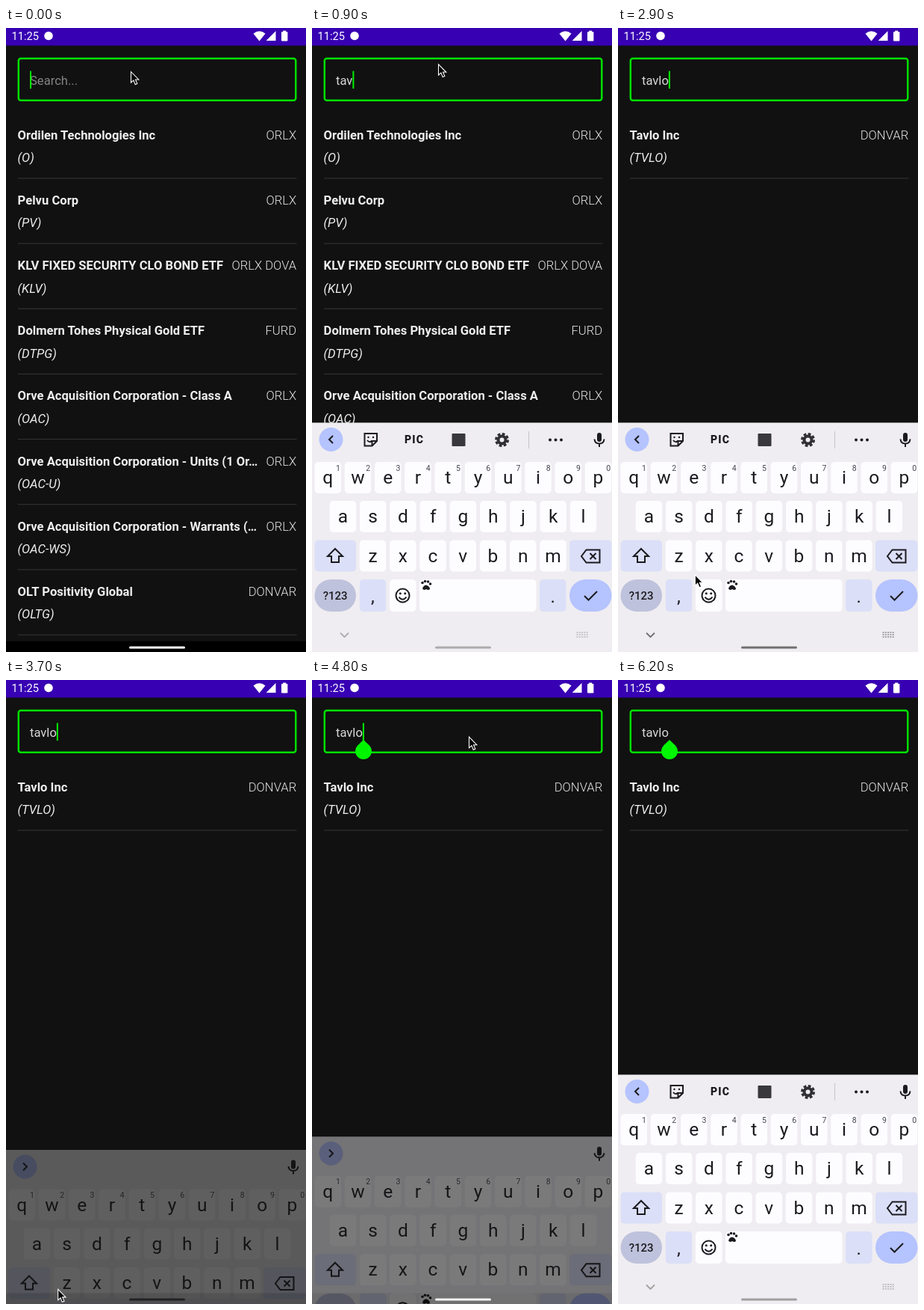
These frames come from a looping animation (402x834 px, 6.4 s). An HTML page:

```html
<!DOCTYPE html>
<html lang="en">
<head>
<meta charset="utf-8">
<title>Stock search</title>
<style>
html, body { margin: 0; width: 100%; height: 100%; overflow: hidden; background: #111; }
svg { display: block; width: 402px; height: 834px; font-family: Roboto, sans-serif; }
.app text { font-size: 16.6px; fill: #eee; }
.app .name { font-weight: 700; }
.app .ticker { font-style: italic; }
.app .market { font-weight: 300; text-anchor: end; fill: #e4e4e4; }
.keys text { text-anchor: middle; fill: #1b1b1f; font-size: 24.5px; }
.keys .digit { font-size: 10.5px; fill: #45464f; }
.line { fill: none; stroke: #1b1b1f; stroke-width: 2; }
</style>
</head>
<body>
<svg id="stage" viewBox="0 0 402 834"></svg>
<script>
const LOOP = 6400;
const WORD = 'tavlo';
const TYPED_AT = [700, 800, 900, 1200, 1450];
const FILTER_AT = 1700;
const TAP_AT = 4650;

// time, x, y of the pointer tip
const POINTER = [[0, 167, 58], [900, 169, 48], [2400, 169, 48], [2900, 103, 730], [3200, 43, 806],
  [3500, 43, 808], [3700, 69, 815], [4300, 186, 121], [4500, 210, 72], [4700, 210, 72], [5000, 210, 83]];
// time, visible share of the keyboard
const KEYBOARD = [[150, 0], [450, 1], [3500, 1], [3800, 0], [4680, 0], [4950, 1]];
// time, grey level of the navigation marks
const NAV = [[150, 255], [450, 232], [900, 172], [1600, 112], [3500, 112], [3680, 34], [3720, 34],
  [4300, 176], [4600, 255], [4950, 234], [5500, 190], [6200, 160]];

const STOCKS = [
  ['Ordilen Technologies Inc', 'O', 'ORLX'],
  ['Pelvu Corp', 'PV', 'ORLX'],
  ['KLV FIXED SECURITY CLO BOND ETF', 'KLV', 'ORLX DOVA'],
  ['Dolmern Tohes Physical Gold ETF', 'DTPG', 'FURD'],
  ['Orve Acquisition Corporation - Class A', 'OAC', 'ORLX'],
  ['Orve Acquisition Corporation - Units (1 Or…', 'OAC-U', 'ORLX'],
  ['Orve Acquisition Corporation - Warrants (…', 'OAC-WS', 'ORLX'],
  ['OLT Positivity Global', 'OLTG', 'DONVAR'],
];

const rect = (x, y, w, h, fill, r = 0, more = '') =>
  `<rect x="${x}" y="${y}" width="${w}" height="${h}" rx="${r}" fill="${fill}" ${more}/>`;
const circle = (x, y, r, fill, more = '') => `<circle cx="${x}" cy="${y}" r="${r}" fill="${fill}" ${more}/>`;
const text = (x, y, s, more = '') => `<text x="${x}" y="${y}" ${more}>${s}</text>`;
const path = (d, more = 'class="line"') => `<path d="${d}" ${more}/>`;

function row([name, ticker, market], i) {
  const y = i * 87.17;
  return text(15.6, y + 148.8, name, 'class="name"') +
    text(389.2, y + 148.8, market, 'class="market"') +
    text(15.6, y + 179.3, `(${ticker})`, 'class="ticker"') +
    rect(16, y + 200.4, 373.5, 1, '#363636');
}

function statusBar() {
  return rect(0, 0, 402, 23.5, '#3700b3') +
    text(7.5, 16.4, '11:25', 'font-size="14.6" fill="#fff"') +
    circle(57, 10.5, 5.8, '#fff') +
    path('M331.5 7.5Q339.5 1 347.5 7.5L339.5 17.5ZM349 17V16.5L361.5 4V17Z', 'fill="#fff"') +
    rect(369, 5, 8.4, 12.5, '#fff', 1.2) + rect(371.2, 3.6, 4, 2, '#fff');
}

function keyRow(letters, x, y, digits = '') {
  return [...letters].map((c, i) => {
    const left = x + i * 40.25;
    return rect(left, y, 35.5, 42, '#fdfcff', 5) + text(left + 17.7, y + 29, c) +
      (digits ? text(left + 31.5, y + 11.5, digits[i], 'class="digit"') : '');
  }).join('');
}

function toolbar() {
  return path('M70.5 542H87V552L80.5 558.5H70.5ZM87 552H80.5V558.5M74 551Q77 555 80.5 551.5') +
    circle(75.5, 547, 1.2, '#1b1b1f') + circle(82, 547, 1.2, '#1b1b1f') +
    text(137, 555, 'PIC', 'style="font-size:14px;font-weight:900;letter-spacing:1.2px"') +
    rect(187.5, 542, 18, 17, '#38383d', 1) +
    circle(254.5, 550.5, 5, 'none', 'stroke="#303034" stroke-width="4"') +
    circle(254.5, 550.5, 8, 'none', 'stroke="#303034" stroke-width="3" stroke-dasharray="3.8 2.483"') +
    rect(290, 539, 1, 23, '#c6c5cb') +
    [319, 326.5, 334].map(x => circle(x, 550.5, 2, '#1b1b1f')).join('');
}

function keyboard() {
  const special = '#dbdff8', accent = '#b5c3ff', dark = '#1b1b1f';
  const paw = [[148, 741.5], [151.5, 739.5], [155.5, 740], [158.5, 743]];
  let dots = '';
  for (let i = 0; i < 15; i++)
    dots += rect(354.5 + i % 5 * 3.3, 807 + (i / 5 | 0) * 3, 2, 1.7, 'currentColor', 0, 'opacity=".7"');
  return rect(0, 527.5, 402, 307, '#efedf1') +
    circle(25.5, 550, 16, accent) + '<path id="fold" class="line"/>' +
    `<g id="tools">${toolbar()}</g>` +
    rect(382, 541, 6, 12, dark, 3) + path('M378.5 549.5Q379 555.5 385 555.5T391.5 549.5M385 555.5V560') +
    keyRow('qwertyuiop', 3.5, 580, '1234567890') +
    keyRow('asdfghjkl', 23.7, 632) +
    keyRow('zxcvbnm', 63.8, 684.5) +
    rect(3.5, 684.5, 55.5, 42, special, 5) + path('M31 696L41 706H36V714H26V706H21Z') +
    rect(345, 684.5, 56.5, 42, special, 5) +
    path('M361 706L367.5 697.5H385.5V714.5H367.5ZM372.500 702L380.500 710M380.500 702L372.500 710') +
    rect(3.5, 737, 55.5, 43, '#bfc2dc', 21.5) +
    text(31.2, 764, '?123', 'style="font-size:15px;font-weight:500"') +
    rect(63.8, 737, 35.5, 43, special, 5) + text(81.5, 768, ',') +
    rect(104, 737, 35.5, 43, '#fdfcff', 5) +
    circle(121.5, 758.5, 9, 'none', 'class="line"') + path('M116.5 760.5Q121.5 767 126.5 760.5') +
    circle(118.3, 755.8, 1.5, dark) + circle(124.7, 755.8, 1.5, dark) +
    rect(144, 737, 156.5, 43, '#fdfcff', 5) +
    paw.map(([x, y]) => circle(x, y, 1.8, dark)).join('') +
    path('M148 749.5Q149 745 153 744.5Q158 746 158 750Q156 752 153 750Q150 752 148 749.5Z', `fill="${dark}"`) +
    rect(305, 737, 35.5, 43, special, 5) + text(322.8, 768, '.') +
    rect(345, 737, 56.5, 43, accent, 21.5) + path('M365 759L370.5 764.5L382 753') +
    `<g id="marks">${path('M38 808.5L43.5 814L49 808.5', 'fill="none" stroke="currentColor" stroke-width="1.8"')}${dots}</g>`;
}

const $ = id => document.getElementById(id);
$('stage').innerHTML = rect(0, 0, 402, 834, '#111') + rect(0, 819.5, 402, 15, '#000') +
  `<g class="app"><g id="all">${STOCKS.map(row).join('')}</g>` +
  `<g id="found">${row(['Tavlo Inc', 'TVLO', 'DONVAR'], 0)}</g>` +
  rect(16.8, 40.8, 371.5, 56, 'none', 3, 'stroke="#00e000" stroke-width="2.5"') +
  text(32, 75.5, '', 'id="query"') + '</g>' +
  rect(0, 57.5, 2, 23.5, '#00f000', 0, 'id="caret"') +
  path('M69 80L76.9 87.4A11 11 0 1 1 61.1 87.4Z', 'id="handle" fill="#00f500"') +
  statusBar() + `<g id="keys" class="keys">${keyboard()}</g>` +
  rect(165, 826.6, 75, 3, '#fff', 1.5, 'id="pill"') +
  path('M0 0V14.5L3.4 11.4L5.7 17L8.3 15.9L6 10.5H10.3Z', 'id="pointer" fill="#000" stroke="#fff" stroke-width="1.1"');

// Straight-line reading of a key list, held at both ends
function read(keys, t) {
  const n = keys.findIndex(k => k[0] > t);
  if (n < 0) return keys[keys.length - 1].slice(1);
  if (n === 0) return keys[0].slice(1);
  const a = keys[n - 1], b = keys[n], f = (t - a[0]) / (b[0] - a[0]);
  return a.slice(1).map((v, i) => v + (b[i + 1] - v) * f);
}

const show = (id, on) => $(id).setAttribute('visibility', on ? 'visible' : 'hidden');

function draw(t) {
  const count = TYPED_AT.filter(at => at <= t).length;
  const query = $('query');
  query.textContent = count ? WORD.slice(0, count) : 'Search...';
  query.style.fill = count ? '#d8d8d8' : '#858585';
  $('caret').setAttribute('x', count ? 32 + query.getComputedTextLength() : 32);
  show('caret', t < 1500 || Math.floor(t / 500) % 2);
  show('handle', t >= TAP_AT);
  show('all', t < FILTER_AT);
  show('found', t >= FILTER_AT);

  const [open] = read(KEYBOARD, t);
  $('keys').setAttribute('opacity', open);
  $('keys').setAttribute('transform', `translate(0 ${150 * (1 - open)})`);
  const unfolded = open > 0.8;
  show('tools', unfolded);
  $('fold').setAttribute('d', unfolded ? 'M28 545L23 550L28 555' : 'M23 545L28 550L23 555');

  const grey = Math.round(read(NAV, t)[0]);
  const tone = `rgb(${grey},${grey},${grey})`;
  $('pill').setAttribute('fill', tone);
  $('marks').style.color = tone;

  const [x, y] = read(POINTER, t);
  $('pointer').setAttribute('transform', `translate(${x + 0.5} ${y + 0.5})`);
  show('pointer', t < 5400);
}

const start = performance.now();
function tick() {
  draw((performance.now() - start) % LOOP);
  requestAnimationFrame(tick);
}
tick();
</script>
</body>
</html>
```
